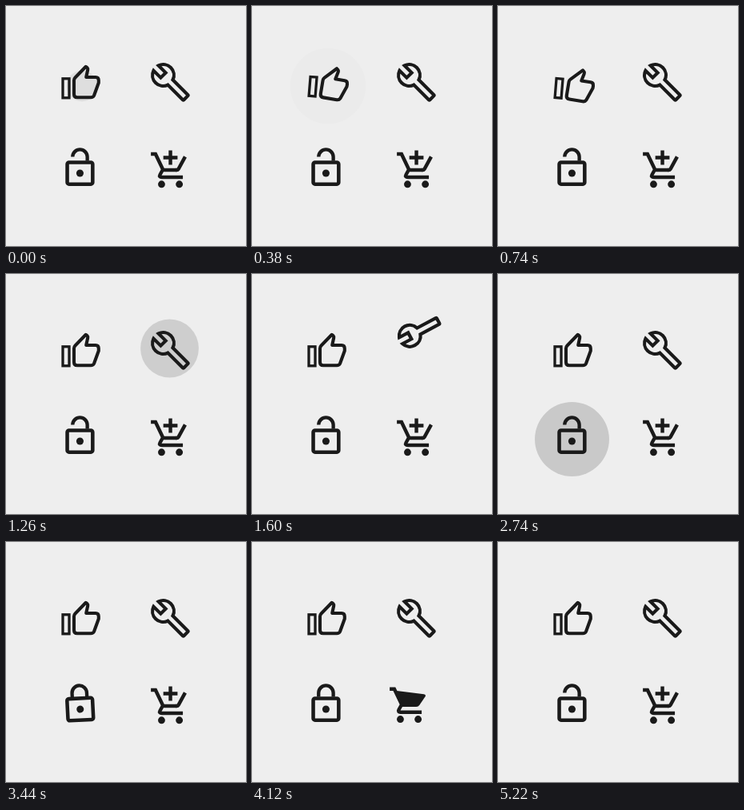
Recreate the animation shown at these times as an HTML page. Size 300x300 px, loop 5.78 s.

```html
<!DOCTYPE html>
<html lang="en">
<head>
<meta charset="utf-8">
<title>Icon interactions</title>
<style>
  html, body { margin: 0; width: 100%; height: 100%; overflow: hidden; background: #eee; }
  svg { display: block; width: 100%; height: 100%; }
  .line { fill: none; stroke: #1a1a1a; }
</style>
</head>
<body>
<svg viewBox="0 0 300 300" fill="#1a1a1a">
  <g id="ripples" fill="#000"></g>

  <g id="thumb" class="line">
    <rect id="cuff" x="71" y="90.8" width="8" height="24" stroke-width="3.3"/>
    <path id="hand" stroke-width="4.1" stroke-linejoin="round" d="M85 93Q85 91 86.5 89.5L99.8 75.8L101.7 77.4Q102.6 78.3 102.2 79.8L100.2 89H112Q115.8 89 115.8 93V96L110 112Q109 114.2 106 114.2H89Q85 114.2 85 110.2Z"/>
  </g>

  <g id="wrench">
    <path class="line" stroke-width="4.2" transform="translate(196.5 86.5) rotate(45)" d="M12.6-4.4A13.3 13.3 0 0 0-12.6-4.4H0V4.4H-12.6A13.3 13.3 0 0 0 12.6 4.4H39Q40 4.4 40 3.4V-3.4Q40-4.4 39-4.4Z"/>
  </g>

  <g id="lock">
    <g class="line" transform="translate(65.2 175) scale(2.27)">
      <rect x="5" y="9" width="14" height="12" rx="1" stroke-width="2"/>
      <path id="shackle" stroke-width="1.9"/>
      <circle cx="12" cy="15" r="2" fill="#1a1a1a" stroke="none"/>
    </g>
  </g>

  <g id="cart">
    <g class="line" stroke-width="2" transform="translate(178.9 178.4) scale(2.22)">
      <path d="M1 3H3.6L7.9 12H15.5M7.6 12L6.1 14.7C5.6 15.6 6.2 16 7 16H19"/>
      <path id="rim" d="M15 12H15.5Q16.2 12 16.5 11.5L20.3 4.5"/>
      <path id="plus" d="M12 1V9M8 5H16"/>
      <g fill="#1a1a1a" stroke="none">
        <circle cx="7" cy="20" r="2"/>
        <circle cx="17" cy="20" r="2"/>
        <path id="load" d="M5 4L20.3 5.9Q21.6 6.2 21 7.3L17.8 12Q17.1 13 16 13H8.5Z"/>
      </g>
    </g>
  </g>
</svg>
<script>
const LOOP = 5780;
const $ = id => document.getElementById(id);
const set = (id, name, value) => $(id).setAttribute(name, value);

const part = (t, from, to) => Math.min(1, Math.max(0, (t - from) / (to - from)));
const fade = (t, from, to) => {
  const p = part(t, from, to);
  return p * p * (3 - 2 * p);
};
// Rises from 0 to 1 and falls back
const hill = (t, from, to) => Math.sin(Math.PI * part(t, from, to)) ** 2;
// Oscillation that swells quickly and dies away
const swing = (t, from, to, turns, size) => {
  const p = part(t, from, to);
  return size * Math.sin(2 * Math.PI * turns * p) * Math.sin(Math.PI * p) * (1 - p);
};

function addRipple(start, cx, cy) {
  const el = document.createElementNS("http://www.w3.org/2000/svg", "circle");
  el.setAttribute("cx", cx);
  el.setAttribute("cy", cy);
  $("ripples").append(el);
  return t => {
    const s = t - start;
    const on = s >= 0 && s < 390;
    el.setAttribute("r", 47.5 - 28.5 * (1 - part(s, 0, 300)) ** 3);
    el.setAttribute("opacity", on ? 0.16 * Math.sin(Math.PI * (s + 60) / 450) : 0);
  };
}

const ripples = [
  addRipple(0, 95, 100),
  addRipple(1180, 204.5, 93),
  addRipple(2540, 92.5, 206.5),
  addRipple(3700, 203.5, 206.5)
];

function drawThumb(t) {
  const turn = swing(t, 240, 1040, 2, 27);
  set("thumb", "transform", `translate(0 ${-12 * hill(t, 330, 700)})`);
  set("hand", "transform", `rotate(${turn} 75 116)`);
  set("cuff", "transform", `rotate(${turn / 2} 75 116)`);
}

function drawWrench(t) {
  const turn = 73 * (fade(t, 1650, 1940) - fade(t, 1340, 1580)) + swing(t, 1900, 2340, 1, 22);
  set("wrench", "transform", `rotate(${turn} 190.7 81.4)`);
}

function drawLock(t, reset) {
  const shut = fade(t, 2800, 2980) - reset;
  const turn = swing(t, 2980, 3700, 3.5, -9);
  const size = 1 + 0.2 * hill(t, 2960, 3420);
  set("lock", "transform", `translate(92.5 202.5) rotate(${turn}) scale(${size}) translate(-92.5 -202.5)`);
  set("shackle", "d", `M7.95 ${6 + 2.2 * Math.max(0, shut)}V6a4.05 4.05 0 0 1 8.1 0V8.2`);
}

function drawCart(t, reset) {
  const roll = fade(t, 3960, 4160) - fade(t, 4300, 4860);
  const full = fade(t, 3990, 4070) - reset;
  set("cart", "transform", `translate(${-10 * roll} ${-1.4 * roll})`);
  set("plus", "transform", `translate(0 ${-12 * hill(t, 3720, 4040)})`);
  set("load", "opacity", full);
  set("rim", "opacity", 1 - full);
  set("plus", "opacity", 1 - full);
}

function draw(t) {
  const reset = fade(t, 4880, 5220);
  ripples.forEach(ripple => ripple(t));
  drawThumb(t);
  drawWrench(t);
  drawLock(t, reset);
  drawCart(t, reset);
}

const begin = performance.now();
function tick() {
  draw((performance.now() - begin) % LOOP);
  requestAnimationFrame(tick);
}
draw(0);
requestAnimationFrame(tick);
</script>
</body>
</html>
```
